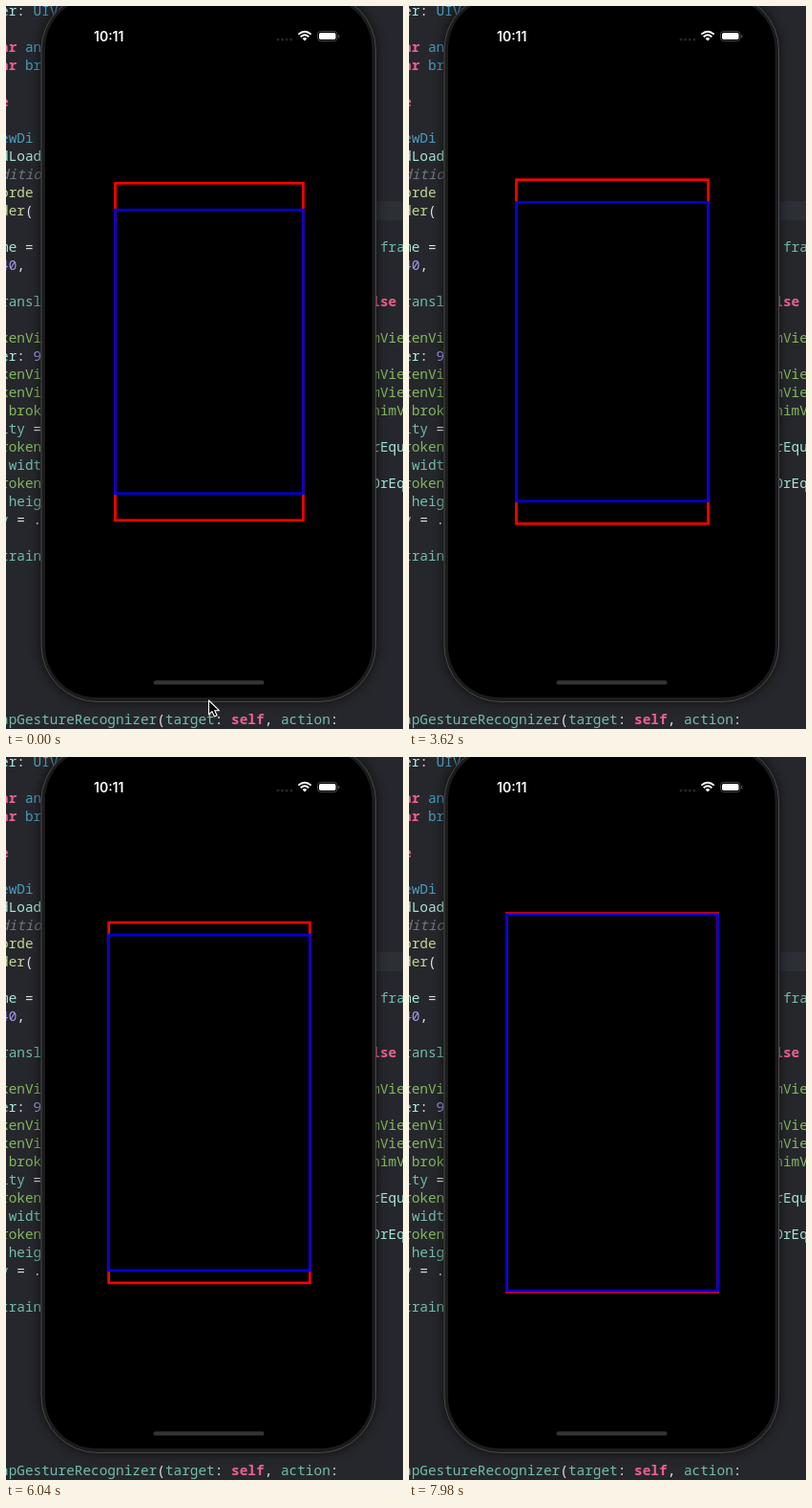
An HTML page that plays this animation: 416 by 756 pixels, repeating every 8000 ms.

```html
<!DOCTYPE html>
<html lang="en">
<head>
<meta charset="utf-8">
<title>Growing frames</title>
<style>
  html, body { margin: 0; width: 100%; height: 100%; overflow: hidden; background: #26272c; }
  svg { display: block; width: 100vw; height: 100vh; }
  #code text { font: 500 14.42px "Noto Sans Mono", monospace; white-space: pre; }
  .kw { fill: #ee6090; font-weight: 700; }
  .ty { fill: #4a9bbd; }
  .fn { fill: #84b860; }
  .de { fill: #bfd695; }
  .id { fill: #72bdaa; }
  .pl { fill: #dfdfe0; }
  .pa { fill: #a8e6d8; }
  .nu { fill: #a198ee; }
  .co { fill: #70777f; font-style: italic; }
  .clock { font: 600 14px Inter, sans-serif; fill: #fff; }
</style>
</head>
<body>
<svg viewBox="0 0 416 756" preserveAspectRatio="none">
  <filter id="soft" x="-20%" y="-20%" width="140%" height="140%">
    <feGaussianBlur stdDeviation="6"/>
  </filter>
  <rect width="416" height="756" fill="#26272c"/>
  <rect x="388" y="204" width="28" height="20" fill="#2c2f36"/>
  <g id="code"></g>

  <rect x="36" y="-14" width="352" height="742" rx="59" fill="#000" opacity=".6" filter="url(#soft)"/>
  <rect x="37" y="-13" width="350.5" height="740.5" rx="59" fill="#1b1b1c" stroke="#484848"/>
  <rect x="41" y="-9" width="342.5" height="732" rx="54" fill="#000"/>

  <text class="clock" x="92" y="36.5">10:11</text>
  <g fill="#262626">
    <circle cx="285" cy="35" r="1.5"/><circle cx="289.6" cy="35" r="1.5"/>
    <circle cx="294.2" cy="35" r="1.5"/><circle cx="298.8" cy="35" r="1.5"/>
  </g>
  <g fill="none" stroke="#fff" stroke-width="1.9">
    <path d="M306.3 29.6Q313 23.8 319.7 29.6"/>
    <path d="M308.7 32.2Q313 28.4 317.3 32.2"/>
  </g>
  <path d="M310.6 34Q313 32 315.4 34L313 36.6Z" fill="#fff"/>
  <rect x="326.5" y="26.5" width="20.5" height="10" rx="3" fill="none" stroke="#484848"/>
  <rect x="328" y="28" width="17.5" height="7" rx="1.8" fill="#fff"/>
  <rect x="348" y="30" width="1.3" height="3.4" rx=".6" fill="#484848"/>
  <rect x="154.5" y="705.2" width="116" height="4.4" rx="2.2" fill="#343434"/>

  <rect id="red" fill="none" stroke="#f00" stroke-width="2.7"/>
  <rect id="blue" fill="none" stroke="#0000d8" stroke-width="2.7"/>
  <path id="cursor" d="M0 0V15L3.5 11.7L5.9 17L8.6 15.8L6.2 10.7H10.8Z"
        fill="#000" stroke="#fff" stroke-width="1.1" stroke-linejoin="round"/>
</svg>
<script>
const LOOP = 8000;
const $ = id => document.getElementById(id);

// Code lines: row | column | class:text pieces separated by "~"
const lines = `
0|0|pa:er~pl:: ~ty:UIVi
2|0|kw:ar~ty: an
3|0|kw:ar~ty: br
5|0|kw:e
7|0|ty:ewDi
8|0|pa:dLoad
9|0|co:ditio
10|0|de:orde
11|0|de:der~pl:(
13|0|pa:me~pl: =
13|46|id:fra
14|0|nu:40~pl:,
16|0|id:ransl
16|45|kw:lse
18|0|fn:kenVi
18|45|fn:mVie
19|0|pa:er~pl:: ~nu:9
20|0|fn:kenVi
20|45|fn:mVie
21|0|fn:kenVi
21|45|fn:mVie
22|0|fn: brok
22|45|fn:nimV
23|0|id:ity~pl: =
24|0|fn:roken
24|45|pa:rEqu
25|0|pl:.~id:widt
26|0|fn:roken
26|45|pa:OrEq
27|0|pl:.~id:heig
28|0|id:y~pl: = .
30|0|id:train
39|0|id:apGestureRecognizer~pl:(~id:target~pl:: ~kw:self~pl:, ~id:action~pl::`;

const ns = 'http://www.w3.org/2000/svg';
for (const line of lines.trim().split('\n')) {
  const [row, col, body] = line.split('|');
  const text = document.createElementNS(ns, 'text');
  text.setAttribute('x', -6 + col * 8.65);
  text.setAttribute('y', 10 + row * 19);
  for (const piece of body.split('~')) {
    const span = document.createElementNS(ns, 'tspan');
    span.setAttribute('class', piece.slice(0, 2));
    span.textContent = piece.slice(3);
    text.append(span);
  }
  $('code').append(text);
}

const clamp = v => Math.min(1, Math.max(0, v));

// cubic-bezier(.42, 0, .58, 1)
function easeInOut(x) {
  let lo = 0, hi = 1;
  for (let i = 0; i < 24; i++) {
    const s = (lo + hi) / 2;
    const bx = 3 * (1 - s) * s * (.42 * (1 - s) + .58 * s) + s * s * s;
    if (bx < x) lo = s; else hi = s;
  }
  return lo * lo * (3 - 2 * lo);
}

function setBox(el, w, h) {
  el.setAttribute('x', 213 - w / 2);
  el.setAttribute('y', 361.5 - h / 2);
  el.setAttribute('width', w);
  el.setAttribute('height', h);
}

function draw(t) {
  const grow = easeInOut(clamp((t - 700) / 14500));
  const w = 197 + 48.5 * grow;
  setBox($('red'), w, 352.5 + 86 * grow);
  setBox($('blue'), w, 296.5 + 192 * grow);

  const move = easeInOut(clamp(t / 700));
  $('cursor').setAttribute('transform', `translate(${212.5 - 3 * move} ${726 - 103 * move})`);
  $('cursor').style.display = t < 2100 ? '' : 'none';
}

function tick(now) {
  draw(now % LOOP);
  requestAnimationFrame(tick);
}
draw(0);
requestAnimationFrame(tick);
</script>
</body>
</html>
```
